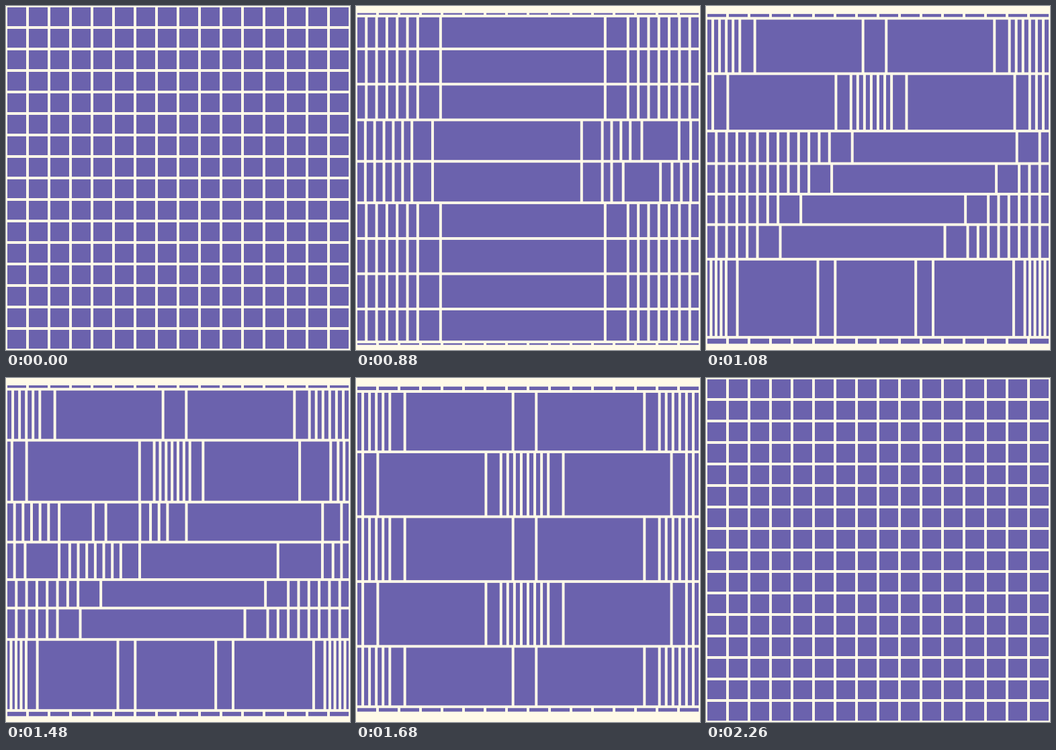
Recreate the animation shown at these times as an HTML page with a canvas. Size 512 px wide and 512 px high, loop 2560 ms.

```html
<!DOCTYPE html>
<html lang="en">
<head>
<meta charset="utf-8">
<title>Elastic grid</title>
<style>
  html, body { margin: 0; width: 100%; height: 100%; overflow: hidden; background: #fffae8; }
  canvas { display: block; }
</style>
</head>
<body>
<canvas id="stage" width="512" height="512"></canvas>
<script>
const SIZE = 512, N = 16, GAP = 2, LOOP = 2560, TICK = 20;
const SELF = 15, BESIDE = 1.22;
const ctx = document.getElementById('stage').getContext('2d');

// rows: swollen columns per grid row, from row `top` down.
// Rows in `early` begin to swell one tick before the others.
const shapes = [
  { top: 4, rows: Array(9).fill([7]), early: [4, 12], start: 280, end: 1000 },
  { top: 5, rows: [[6, 8], [2, 11], [13], [11], [8], [6], [5, 7, 9]], early: [7, 8], start: 880, end: 1600 },
  { top: 5, rows: [[6, 8], [2, 12], [6, 8], [2, 12], [6, 8]], early: [6, 8], start: 1480, end: 2180 }
];

// Rises from 0 to 1 in five ticks, the first one at `start`.
const ramp = (t, start) =>
  Math.max(0, Math.min(5, Math.floor((t - start) / TICK) + 1)) / 5;

function pressures(t) {
  const grid = Array.from({ length: N }, () => Array(N).fill(0));
  for (const { top, rows, early, start, end } of shapes) {
    rows.forEach((cols, i) => {
      const y = top + i;
      const late = y < early[0] || y > early[1];
      const p = ramp(t, start + (late ? TICK : 0)) - ramp(t, end);
      for (const x of cols) grid[y][x] += p;
    });
  }
  return grid;
}

// Shares the stage among the tracks; returns their edges.
function edges(load) {
  const weights = load.map((p, i) =>
    1 + SELF * p + BESIDE * ((load[i - 1] || 0) + (load[i + 1] || 0)));
  const unit = SIZE / weights.reduce((a, b) => a + b);
  let pos = 0;
  return [0, ...weights.map(w => pos += w * unit)];
}

function draw() {
  const grid = pressures(performance.now() % LOOP);
  const ys = edges(grid.map(row => row.reduce((a, b) => a + b)));
  ctx.fillStyle = '#fffae8';
  ctx.fillRect(0, 0, SIZE, SIZE);
  ctx.fillStyle = '#6b62ad';
  grid.forEach((row, r) => {
    const h = ys[r + 1] - ys[r] - 2 * GAP;
    if (h <= 0) return;
    const xs = edges(row);
    for (let c = 0; c < N; c++) {
      ctx.fillRect(xs[c] + GAP, ys[r] + GAP, xs[c + 1] - xs[c] - 2 * GAP, h);
    }
  });
  requestAnimationFrame(draw);
}
draw();
</script>
</body>
</html>
```
